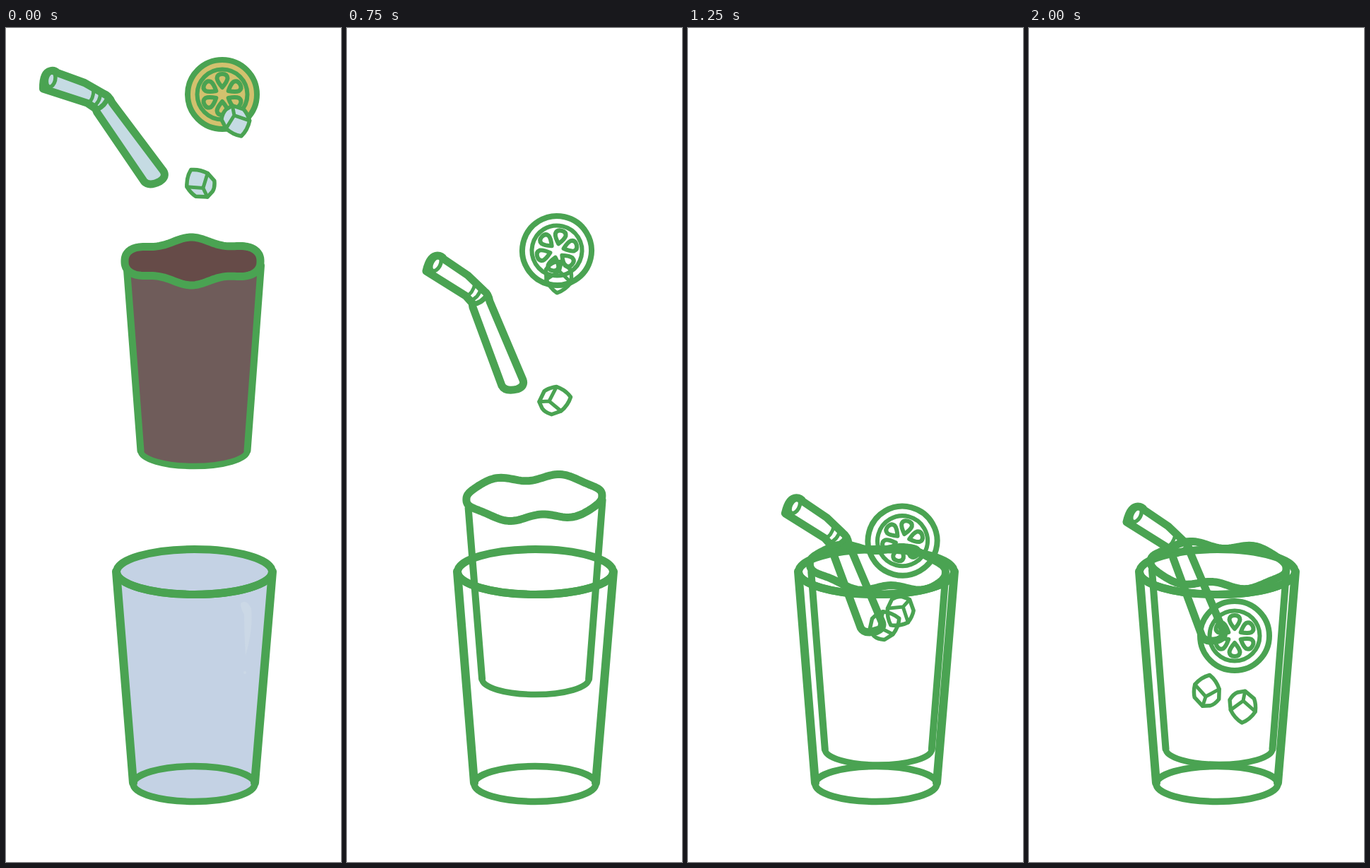
These frames come from a looping animation (474x1180 px, 2500 ms). An HTML page:

```html
<!DOCTYPE html>
<html lang="en">
<head>
<meta charset="utf-8">
<title>Iced drink</title>
<style>
html, body { margin: 0; width: 100%; height: 100%; overflow: hidden; background: #fff; }
svg { display: block; width: 100vw; height: 100vh; }
</style>
</head>
<body>
<svg id="stage" viewBox="0 0 474 1180" stroke="#4aa352" fill="none" stroke-linejoin="round" stroke-linecap="round"></svg>
<script>
const STEP = 250, LOOP = 2500, LAST = 8;
const GREEN = '#4aa352', BODY = '#6f5c5a', TOP = '#664b48', GLASS = '#c4d2e4';
const ICE = '#c5dbe3', LEMON = '#d2c16e', SHINE = '#cbd8e6';
const stage = document.getElementById('stage');

// Key points: [step, x, y, turn]
const strawKeys = [[0, 133, 103, -14], [1, 155, 142, 0], [2, 155, 249, 0], [3, 186, 380, 0], [4, 208, 644, 0], [6, 211, 751, 0], [8, 212, 735, 0]];
const lemonKeys = [[0, 306, 94, 0], [1, 286, 129, 13], [2, 286, 189, 13], [3, 297, 315, 13], [4, 309, 610, 13], [6, 296, 793, 15], [8, 291, 860, 0]];
const bigIceKeys = [[0, 326, 131, 165], [1, 326, 168, 140], [2, 312, 225, 160], [3, 300, 352, 190], [4, 284, 640, 225], [6, 316, 952, 203], [8, 303, 960, 187]];
const smallIceKeys = [[0, 274, 220, -30], [1, 264, 265, 0], [2, 276, 322, 12], [4, 302, 727, 130], [6, 250, 914, -3], [8, 251, 938, 14]];
// [step, surface x, surface y, bottom x, bottom y]
const cupKeys = [[0, 264, 330, 266, 598], [1, 257, 411, 264, 673], [2, 262, 555, 264, 812], [4, 267, 744, 269, 1001], [6, 269, 760, 269, 1017], [8, 268, 760, 269, 1020]];
// [step, tilt, back crest x, front crest x]
const waveKeys = [[0, 0, 262, 310], [1, -17, 305, 235], [2, -12, 310, 236], [4, 5, 300, 306], [6, 5, 323, 262], [8, 5, 322, 260]];
// [step, edge, x, height, width]
const splashes = [[1, 'back', 196, 20, 12], [1, 'back', 240, -14, 25], [1, 'back', 318, 16, 18], [2, 'back', 334, 65, 11], [2, 'front', 236, 16, 14]];
// [step, x, y, radius]
const drops = [[1, 233, 309, 6], [2, 235, 409, 11.5], [2, 206, 435, 11.5], [2, 304, 473, 12.5], [2, 283, 351, 5]];

// Smooth curve through key points, at rest at both ends
function glide(keys, s) {
  const i = Math.max(0, keys.findIndex(k => k[0] >= s) - 1);
  const a = keys[i], b = keys[i + 1], h = b[0] - a[0], u = (s - a[0]) / h;
  const slope = (j, c) => keys[j - 1] && keys[j + 1]
    ? (keys[j + 1][c] - keys[j - 1][c]) / (keys[j + 1][0] - keys[j - 1][0]) : 0;
  const ease = u * u * (3 - 2 * u);
  return a.slice(1).map((v, k) => v + (b[k + 1] - v) * ease +
    h * u * (1 - u) * ((1 - u) * slope(i, k + 1) - u * slope(i + 1, k + 1)));
}

const path = (d, w, fill = 'none') => `<path d="${d}" stroke-width="${w}" fill="${fill}"/>`;
const blob = (d, fill) => `<path d="${d}" stroke="none" fill="${fill}"/>`;
const oval = (x, y, rx, ry, w, fill = 'none') =>
  `<ellipse cx="${x}" cy="${y}" rx="${rx}" ry="${ry}" stroke-width="${w}" fill="${fill}"/>`;
const dot = (x, y, r, fill) => `<circle cx="${x}" cy="${y}" r="${r}" stroke="none" fill="${fill}"/>`;
const spin = (turn, body) => `<g transform="rotate(${turn})">${body}</g>`;
const place = ([x, y, turn], body) => `<g transform="translate(${x} ${y})">${spin(turn, body)}</g>`;

function glassBack(filled) {
  const rim = oval(266.5, 769.5, 110, 32, 11);
  if (!filled) return rim;
  return blob('M157 769A110 32 0 0 1 376 769L352 1069A86 25 0 0 1 180 1069Z', GLASS) +
    blob('M332 814Q340 807 347 821Q350 850 339 888Q337 855 337 830Q332 822 332 814Z', SHINE) +
    dot(338, 912, 2, SHINE) + rim;
}

const glassFront = () =>
  path('M156.5 769.5A110 32 0 0 0 376.5 769.5', 11) +
  path('M156 769L180 1068M377 769L352 1068', 12) +
  oval(266, 1069.5, 86, 25, 9.5);

// An ellipse whose back and front edges ripple and splash
function surface(s, x0, y0) {
  const [tilt, back, front] = glide(waveKeys, s);
  const pts = [];
  for (let i = 0; i < 160; i++) {
    const a = i / 80 * Math.PI, sin = Math.sin(a), edge = sin < 0 ? 'back' : 'front';
    const x = x0 + 96 * Math.cos(a), depth = Math.abs(sin) ** 0.8;
    const ripple = 5 * Math.cos((x - (sin < 0 ? back : front)) / 96 * 2 * Math.PI);
    let y = y0 + tilt * Math.cos(a) + depth * (Math.sign(sin) * 29 - ripple);
    for (const [step, side, cx, height, w] of splashes)
      if (step === s && side === edge) y -= height * Math.exp(-(((x - cx) / w) ** 4));
    pts.push(x.toFixed(1) + ' ' + y.toFixed(1));
  }
  return 'M' + pts.join('L') + 'Z';
}

function drink(s, filled) {
  const [x, y, bx, by] = glide(cupKeys, s);
  const [tilt] = glide(waveKeys, s);
  const left = `${bx - 95} ${y - tilt + 12}`, right = `${bx + 95} ${y + tilt + 6}`;
  const arc = `A75.5 22 0 0 0 ${bx + 75.5} ${by}`, base = `${bx - 75.5} ${by}`;
  return (filled ? blob(`M${left}L${base}${arc}L${right}Z`, BODY) : '') +
    path(`M${base}${arc}`, 8.5) +
    path(`M${left}L${base}M${right}L${bx + 75.5} ${by}`, 10) +
    path(surface(s, x, y), 11, filled ? TOP : 'none');
}

// Drawn around its elbow
const straw = fill =>
  path('M-74 -36Q-69 -58 -58 -58Q-52 -58 -49 -53L-15 -30L8 -8Q14 -4 16 7L63 118Q66 127 55 131Q38 135 33 126L-8 15L-9 9L-18 -1Z', 11, fill) +
  place([-60, -46, 28], oval(0, 0, 6, 10.5, 5.5)) +
  path('M-18 0Q-8 -4 -5 -18M-12 6Q1 1 3 -11', 5) +
  path('M-8 11Q5 9 12 -2', 7);

function lemon(fill) {
  let s = oval(0, 0, 49, 49, 8, fill) + oval(0, 0, 35.5, 35.5, 6);
  for (let a = 0; a < 360; a += 60)
    s += spin(a, path('M0 -10Q-7 -18 -7.500 -23Q-7 -29 0 -29Q7 -29 7.500 -23Q7 -18 0 -10Z', 6));
  return s;
}

const cube = fill =>
  path('M-1 -23Q10 -18 17 -7L20 7Q16 16 10 19L0 22L-14 13Q-18 5 -18 -5Q-12 -17 -1 -23Z', 5.5, fill) +
  path('M-18 -5L1 8L17 -7M1 8L0 22', 5);

function render(s) {
  const filled = s < 3, tint = c => filled ? c : 'none', ice = cube(tint(ICE));
  stage.innerHTML = glassBack(filled) + drink(s, filled) + glassFront() +
    place(glide(strawKeys, s), straw(tint(ICE))) +
    place(glide(lemonKeys, s), lemon(tint(LEMON))) +
    place(glide(bigIceKeys, s), ice) + place(glide(smallIceKeys, s), ice) +
    drops.filter(d => d[0] === s).map(([, x, y, r]) => dot(x, y, r, GREEN)).join('');
}

let shown = -1;
const start = performance.now();
function tick(now) {
  const s = Math.min(LAST, Math.floor(Math.max(0, now - start) % LOOP / STEP));
  if (s !== shown) render(shown = s);
  requestAnimationFrame(tick);
}
tick(start);
</script>
</body>
</html>
```
